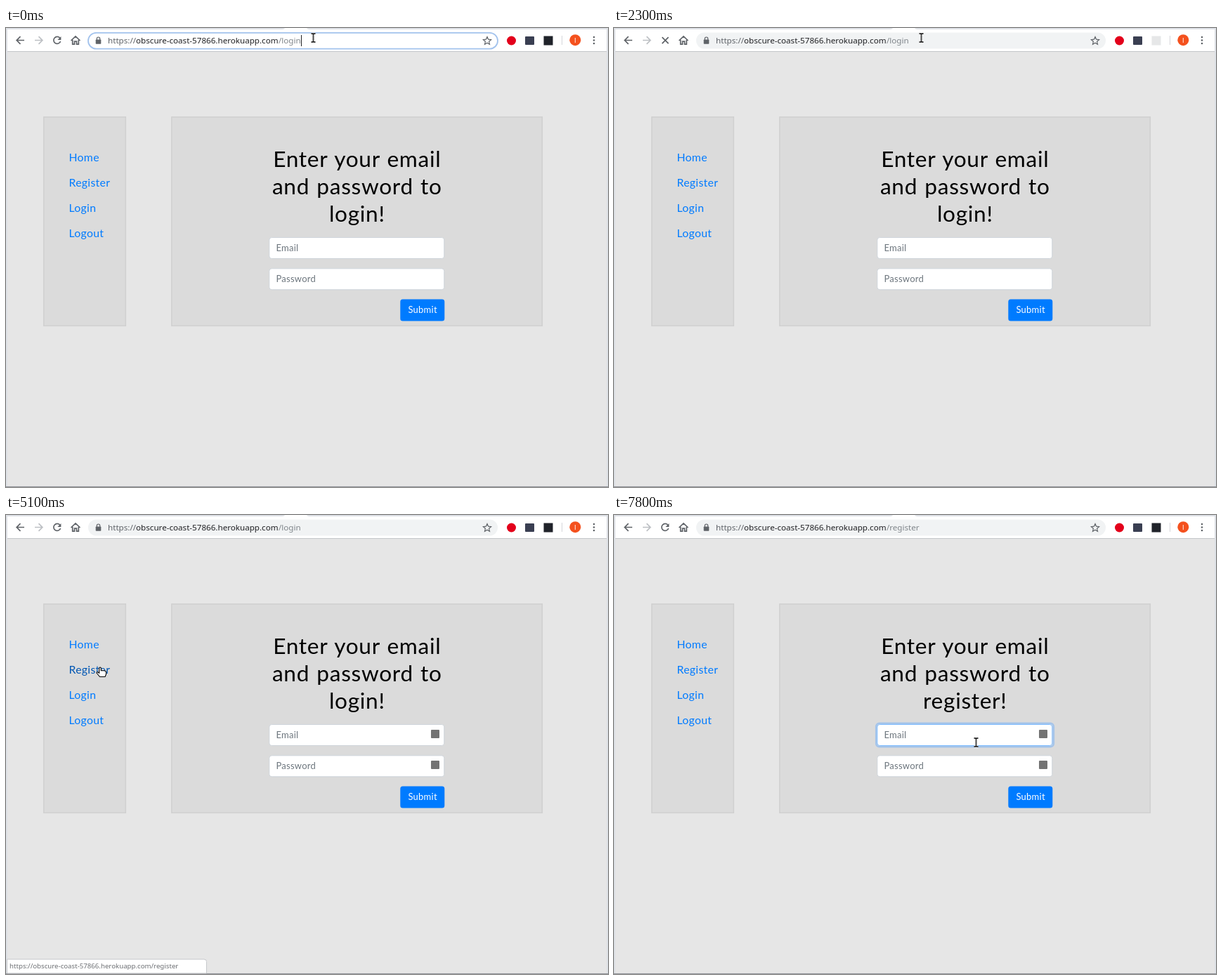
These frames come from a looping animation (857 px wide and 654 px high, 8000 ms). An HTML page:

```html
<!DOCTYPE html>
<html lang="en">
<head>
<meta charset="utf-8">
<title>Login and register</title>
<style>
html, body { margin: 0; width: 100%; height: 100%; overflow: hidden; background: #e6e6e6; }
svg { display: block; }
text { font-family: Lato, "Open Sans", sans-serif; white-space: pre; }

.url { font: 11.63px "Noto Sans", "Open Sans", sans-serif; fill: #202124; }
.dim { fill: #80868b; }
.scheme { fill: #5f6368; }
.icon { fill: none; stroke: #5f6368; stroke-width: 1.7; }
.thin { stroke-width: 1.2; }
.off { stroke: #bdc0c4; }
.panel { fill: #dbdbdb; stroke: #d0d0d0; stroke-width: 1.5; }
.nav { font-size: 15.8px; letter-spacing: .3px; fill: #007bff; }
.title { font-size: 31.6px; letter-spacing: .7px; word-spacing: 1.5px; text-anchor: middle; }
.field { fill: #fff; stroke: #ced4da; }
.hint { font-size: 13px; letter-spacing: .25px; fill: #6c757d; }
.label { font-size: 13px; letter-spacing: .25px; fill: #fff; text-anchor: middle; }
.badge { fill: #737373; }
.pointer { fill: #fff; stroke: #000; stroke-width: 1.1; stroke-linejoin: round; }

/* Every state switches hard within one 8 s loop (1% = 80 ms). */
.anim { animation: 8s step-end infinite; }

#urlCaret { animation-name: url-caret; }
@keyframes url-caret { 0% { opacity: 1 } 5% { opacity: 0 } 11.25% { opacity: 1 } 17.5%, 100% { opacity: 0 } }

#urlFocus { animation-name: url-focus; }
@keyframes url-focus { 0% { opacity: 1 } 22.5%, 100% { opacity: 0 } }

#reload { animation-name: reload; }
@keyframes reload { 0% { opacity: 1 } 22.5% { opacity: 0 } 30%, 100% { opacity: 1 } }
#stop { animation-name: stop; }
@keyframes stop { 0% { opacity: 0 } 22.5% { opacity: 1 } 30%, 100% { opacity: 0 } }

#devtool { animation-name: devtool; }
@keyframes devtool { 0% { fill: #20232a } 23.75% { fill: #e6e7e8 } 30%, 100% { fill: #20232a } }

#page { animation-name: page; }
@keyframes page { 0% { opacity: 1 } 27.5% { opacity: 0 } 28.75%, 100% { opacity: 1 } }

.login { animation-name: login; }
@keyframes login { 0% { opacity: 1 } 68.75%, 100% { opacity: 0 } }
.register { animation-name: register; }
@keyframes register { 0% { opacity: 0 } 68.75%, 100% { opacity: 1 } }

#badges { animation-name: badges; }
@keyframes badges { 0% { opacity: 0 } 38.75% { opacity: 1 } 68.75% { opacity: 0 } 81.25%, 100% { opacity: 1 } }
#emailBadge { animation-name: email-badge; }
@keyframes email-badge { 0% { fill: #737373 } 43.75% { fill: #5c5c5c } 51.25%, 100% { fill: #737373 } }

#registerLink { animation-name: link; }
@keyframes link { 0% { fill: #007bff } 56.25% { fill: #006ddd } 57.5% { fill: #0056b3 } 73.75%, 100% { fill: #007bff } }

#status { animation-name: status; }
@keyframes status { 0% { opacity: 0 } 60% { opacity: .5 } 61.25% { opacity: 1 } 77.5%, 100% { opacity: 0 } }
#statusText { font-size: 9.66px; animation-name: status-text; }
@keyframes status-text { 0% { fill: #8c8f93 } 63.75%, 100% { fill: #6b6e72 } }

#submit { animation-name: submit; }
@keyframes submit { 0% { fill: #007bff } 77.5% { fill: #0069d9 } 81.25% { fill: #0072ec } 82.5%, 100% { fill: #007bff } }

#emailFocus { animation-name: email-focus; }
@keyframes email-focus { 0% { opacity: 0 } 90%, 100% { opacity: 1 } }
#emailCaret { animation-name: email-caret; }
@keyframes email-caret { 0% { opacity: 0 } 87.5% { opacity: 1 } 97.5%, 100% { opacity: 0 } }

#cursor { animation-name: move; }
@keyframes move {
  0% { transform: translate(437.5px, 14px) }
  38.75% { transform: translate(529.5px, 360px) }
  41.25% { transform: translate(537.5px, 366px) }
  43.75% { transform: translate(516.5px, 310px) }
  48.75% { transform: translate(477.5px, 291px) }
  51.25% { transform: translate(243.5px, 238.5px) }
  52.5% { transform: translate(215px, 228px) }
  53.75% { transform: translate(185.5px, 218.5px) }
  56.25% { transform: translate(140px, 213px) }
  57.5% { transform: translate(134px, 216px) }
  61.25% { transform: translate(134px, 217px) }
  73.75% { transform: translate(565px, 407px) }
  77.5% { transform: translate(540px, 348px) }
  81.25% { transform: translate(520px, 306px) }
  82.5%, 100% { transform: translate(515.5px, 324px) }
}
#beam { animation-name: beam; }
@keyframes beam {
  0% { opacity: 1 } 38.75% { opacity: 0 } 41.25% { opacity: 1 }
  48.75% { opacity: 0 } 77.5%, 100% { opacity: 1 }
}
#arrow { animation-name: arrow; }
@keyframes arrow {
  0% { opacity: 0 } 38.75% { opacity: 1 } 41.25% { opacity: 0 }
  48.75% { opacity: 1 } 57.5%, 100% { opacity: 0 }
}
#hand { animation-name: hand; }
@keyframes hand { 0% { opacity: 0 } 57.5% { opacity: 1 } 77.5%, 100% { opacity: 0 } }
</style>
</head>
<body>
<svg width="857" height="654" viewBox="0 0 857 654">
  <defs>
    <path id="beamShape" d="M-3-6H-1Q0-6 0-5Q0-6 1-6H3M0-5V5M-3 6H-1Q0 6 0 5Q0 6 1 6H3"/>
  </defs>

  <!-- window -->
  <rect width="857" height="654" fill="#dee1e6"/>
  <rect x="2" y="33" width="853" height="620" fill="#e6e6e6"/>
  <rect x="2" y="2" width="853" height="31" fill="#fff"/>
  <path d="M393 2q3 0 4-2H428q1 2 4 2z" fill="#fff"/>
  <rect x="2" y="33" width="853" height="1" fill="#c3c5c8"/>
  <rect y="653" width="857" height="1" fill="#92959b"/>

  <!-- toolbar -->
  <path class="icon" d="M26 17.5H15.5M20.5 12.2L15.2 17.5l5.3 5.3"/>
  <path class="icon off" d="M41 17.5H51.5M46.5 12.2l5.3 5.3-5.3 5.3"/>
  <g id="reload" class="anim">
    <path class="icon" d="M76.7 14.2A5 5 0 1 0 77.6 19"/>
    <path d="M78.4 12v5h-5z" fill="#5f6368"/>
  </g>
  <path id="stop" class="icon anim" d="M68.5 13.2l9 9m0-9l-9 9"/>
  <path class="icon" d="M92.5 18L99 12l6.5 6M94.7 17v6.2h2.8v-4h3v4h2.8V17"/>

  <rect x="117" y="6.5" width="583" height="23" rx="11.5" fill="#f1f3f4"/>
  <rect id="urlFocus" class="anim" x="117" y="6.8" width="583" height="22.8" rx="11.4" fill="#fff" stroke="#a3c3ed" stroke-width="1.8"/>
  <rect x="127.7" y="16.5" width="7.6" height="6.3" rx=".8" fill="#5f6368"/>
  <path class="icon thin" d="M129.3 17v-1.8a2.2 2.2 0 0 1 4.4 0V17"/>
  <text class="url" x="145" y="22"><tspan class="scheme">https://</tspan>obscure-coast-57866.herokuapp.com</text>
  <text class="url login anim" x="387.9" y="22"><tspan class="dim">/login</tspan></text>
  <text class="url register anim" x="387.9" y="22"><tspan class="dim">/register</tspan></text>
  <rect id="urlCaret" class="anim" x="420" y="10" width="1" height="16" fill="#202124"/>
  <path class="icon thin" d="M685 12.5l1.6 3.7 4 .4-3 2.7.9 3.9-3.5-2-3.5 2 .9-3.9-3-2.7 4-.4z"/>

  <circle cx="719.5" cy="18" r="6.5" fill="#e3001b"/>
  <rect x="739" y="12" width="13" height="12" rx="1" fill="#3a3f52"/>
  <rect id="devtool" class="anim" x="765.5" y="11.5" width="13" height="13"/>
  <rect x="791" y="11" width="1" height="13" fill="#d5d7da"/>
  <circle cx="810.3" cy="17.2" r="8" fill="#f4511e"/>
  <text x="810.3" y="20.5" font-size="9" text-anchor="middle" fill="#fff">I</text>
  <g fill="#5f6368">
    <circle cx="837" cy="13" r="1.3"/><circle cx="837" cy="17.5" r="1.3"/><circle cx="837" cy="22" r="1.3"/>
  </g>

  <!-- page -->
  <g id="page" class="anim">
    <rect class="panel" x="53.8" y="126.8" width="116.5" height="297.5"/>
    <rect class="panel" x="235.8" y="126.8" width="527.5" height="297.5"/>
    <g class="nav">
      <text x="89.5" y="190">Home</text>
      <text id="registerLink" class="anim" x="89.5" y="226">Register</text>
      <text x="89.5" y="262">Login</text>
      <text x="89.5" y="298">Logout</text>
    </g>
    <g class="title">
      <text x="499.8" y="197.5">Enter your email</text>
      <text x="499.8" y="237">and password to</text>
      <text class="login anim" x="499.8" y="276.3">login!</text>
      <text class="register anim" x="499.8" y="276.3">register!</text>
    </g>
    <rect class="field" x="374.8" y="298.5" width="249" height="30" rx="3.5"/>
    <g id="emailFocus" class="anim">
      <rect x="373.2" y="296.8" width="252.6" height="33.4" rx="4.5" fill="none" stroke="#a4c4ea" stroke-width="2.6"/>
      <rect x="374.8" y="298.5" width="249" height="30" rx="3.5" fill="#fff" stroke="#80bdff"/>
    </g>
    <rect class="field" x="374.8" y="342.8" width="249" height="30" rx="3.5"/>
    <text class="hint" x="384.5" y="318">Email</text>
    <text class="hint" x="384.5" y="362">Password</text>
    <rect id="emailCaret" class="anim" x="385.5" y="304" width="1.3" height="19" fill="#495057"/>
    <g id="badges" class="anim">
      <rect id="emailBadge" class="badge anim" x="605" y="306" width="12" height="12" rx="1"/>
      <rect class="badge" x="605" y="350" width="12" height="12" rx="1"/>
    </g>
    <rect id="submit" class="anim" x="561.3" y="386.5" width="63" height="31" rx="3.5"/>
    <text class="label" x="593.1" y="406.3">Submit</text>
  </g>

  <!-- link address -->
  <g id="status" class="anim">
    <path d="M1.5 653V633H282q3.5 0 3.5 3.5V653z" fill="#fff" stroke="#c6c8cb"/>
    <text id="statusText" class="url anim" x="5" y="646">https://obscure-coast-57866.herokuapp.com/register</text>
  </g>

  <!-- mouse -->
  <g id="cursor" class="anim">
    <g id="beam" class="anim" fill="none">
      <use href="#beamShape" stroke="#fff" stroke-width="3"/>
      <use href="#beamShape" stroke="#000" stroke-width="1.4"/>
    </g>
    <path id="arrow" class="pointer anim" d="M0 0V13.5L3.2 10.7 5.5 16 7.9 15 5.7 9.8H9.8z"/>
    <path id="hand" class="pointer anim" d="M-1.3.8Q0-.8 1.3.8V4.8H5.5Q8.5 5.2 8.5 7V10L7 13.5H-.5L-5 8Q-4.6 6.2-3 7L-1.3 8.3z"/>
  </g>
</svg>
</body>
</html>
```
